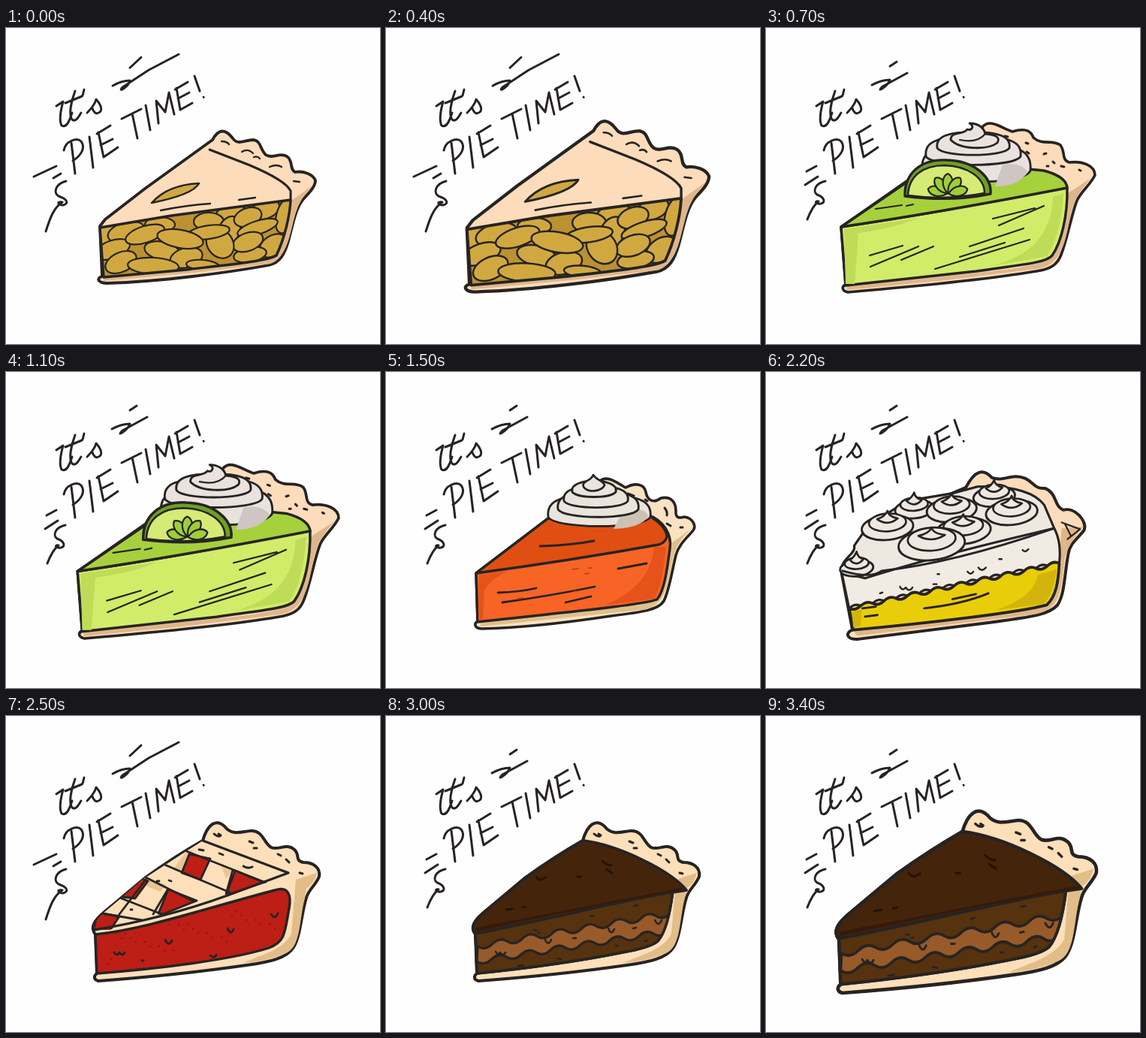
Animation, 498 px wide and 421 px high, one loop 3.5 s. Source, as an HTML page:

```html
<!DOCTYPE html>
<html lang="en">
<head>
<meta charset="utf-8">
<title>Pie time</title>
<style>
html, body { margin: 0; width: 100%; height: 100%; overflow: hidden; background: #fdfefd; }
svg { display: block; width: 498px; height: 421px; }
path, ellipse { stroke-linecap: round; stroke-linejoin: round; }
</style>
</head>
<body>
<svg id="stage" viewBox="0 0 498 421" role="img" aria-label="it's PIE TIME!"></svg>
<script>
const INK = '#262423', CRUST = '#fcdcba', SHADE = '#dfb68a';
const fill = (d, color) => `<path d="${d}" fill="${color}"/>`;
const line = (d, w = 3, color = INK) => `<path d="${d}" fill="none" stroke="${color}" stroke-width="${w}"/>`;
const shape = (d, color, w = 3.4) => `<path d="${d}" fill="${color}" stroke="${INK}" stroke-width="${w}"/>`;
const oval = (x, y, rx, ry, rot, color, w = 2.2) =>
  `<ellipse cx="${x}" cy="${y}" rx="${rx}" ry="${ry}" transform="rotate(${rot} ${x} ${y})" fill="${color}" stroke="${INK}" stroke-width="${w}"/>`;
const clip = (id, d, body) => `<clipPath id="${id}"><path d="${d}"/></clipPath><g clip-path="url(#${id})">${body}</g>`;

// Wavy segments between two points, continuing the current path
function wave(x0, y0, x1, y1, n, a) {
  let d = '';
  for (let i = 0; i < n; i++) {
    const dx = (x1 - x0) / n, dy = (y1 - y0) / n;
    d += `q${dx / 2} ${dy / 2 + (i % 2 ? -a : a)} ${dx} ${dy}`;
  }
  return d;
}

// One whipped layer: flat dome with a rounded underside
const layer = (l, r, y, h, color) =>
  shape(`M${l} ${y}C${l - 3} ${y - h} ${l + 18} ${y - h * 1.25} ${(l + r) / 2} ${y - h * 1.25}S${r + 3} ${y - h} ${r} ${y}C${r - 8} ${y + h * .72} ${l + 8} ${y + h * .72} ${l} ${y}Z`, color, 2.8);

function apple() {
  const front = 'M125 266L220 250L379 229C378 250 371 280 360 303C350 310 300 315 240 322L130 332Z';
  const slices = [
    [345, 242, 20, 12, -20], [372, 250, 12, 24, 15], [300, 250, 22, 14, -10], [355, 290, 20, 13, -35],
    [325, 302, 22, 10, -10], [270, 258, 20, 12, 0], [135, 275, 14, 16, 20], [160, 272, 25, 13, -15],
    [205, 262, 20, 10, 0], [142, 295, 24, 12, -20], [153, 312, 22, 13, -25], [185, 275, 27, 11, -18],
    [208, 297, 24, 12, 12], [240, 306, 22, 13, -15], [297, 270, 14, 20, 25], [322, 252, 19, 12, -20],
    [335, 266, 28, 9, -18], [322, 285, 21, 12, -20], [285, 287, 17, 21, -35], [270, 272, 28, 9, -8],
    [232, 281, 31, 12, 10], [196, 317, 34, 11, 3], [262, 316, 22, 7, 5]
  ];
  return shape('M125 264L132 255L185 214L275 149C283 134 292 134 302 147C309 157 318 149 329 149C340 150 338 162 346 169C355 175 364 165 374 171C383 177 377 188 385 192C396 190 409 195 412 203C412 212 402 221 395 229C385 242 382 262 376 284C371 301 365 313 350 316C295 326 205 338 135 340C122 340 120 333 128 331Z', CRUST, 3.8)
    + fill('M380 230L409 209Q391 228 386 246C378 271 376 305 352 314L250 326L130 337L130 333L330 312Q360 307 366 292Z', SHADE)
    + clip('applefront', front, fill(front, '#bb9131') + slices.map(s => oval(...s, '#d1a840')).join(''))
    + line(front, 3.4) + line('M271 162L325 183Q372 203 379 217V228')
    + shape('M194 233Q215 209 257 207Q249 222 194 233Z', '#d1a840', 2.6)
    + line('M287 151q7 0 10 4M314 165q8-5 15 2M330 172q5-2 8 2M351 185q9-4 16 0M383 204l8 1M206 243q35-7 66-9M310 229l22-3', 2.3);
}

function lime() {
  const front = 'M100 265Q230 246 401 212C402 250 393 286 381 303C374 313 335 316 280 324L106 343Z';
  const top = 'M100 265L185 207Q225 180 309 184L370 190Q400 198 401 213Q230 246 100 265Z';
  let petals = '';
  for (let a = -76; a <= 76; a += 38)
    petals += `<g transform="rotate(${a} 242 221)">${shape('M242 220C232 210 235 197 242 194C249 197 252 210 242 220Z', '#9fce38', 2.2)}</g>`;
  const cream = '#e9e2df';
  return shape('M288 132C298 120 313 133 328 138C341 134 352 134 356 146C368 157 381 148 392 156C399 165 393 176 404 179C421 177 438 183 438 196C432 209 420 217 414 230C406 251 402 279 393 302C388 315 380 321 360 324C290 336 190 345 109 352C100 350 101 344 106 342L100 265L186 205Z', CRUST, 3.6)
    + fill('M402 220L433 200Q412 222 406 247C399 282 395 317 360 321L240 336L108 349V344L280 326Q369 318 382 304Q399 271 402 220Z', SHADE)
    + shape(front, '#d1ec69') + fill('M104 268L203 253Q170 267 123 273L118 341L106 341ZM396 220Q392 279 374 304L300 317Q380 298 382 225Z', '#bedc58')
    + shape(top, '#a6d13d')
    + layer(208, 352, 190, 28, cream) + fill('M315 182Q339 178 349 192Q334 212 305 211Z', '#cfc5c3')
    + layer(213, 339, 171, 21, cream) + layer(228, 324, 160, 17, cream)
    + shape('M246 149C246 137 263 143 268 135C274 137 278 131 271 127C286 127 291 136 292 141C304 142 313 145 308 153C295 163 258 162 246 149Z', cream, 2.8)
    + line('M258 149Q281 154 292 141', 2.2)
    + shape('M185 224C184 194 206 174 241 176C276 177 301 197 299 221Q245 232 185 224Z', '#6d9f27', 3.4)
    + shape('M189 223C190 197 209 183 238 183C268 184 291 199 291 220Q238 230 189 223Z', '#d5eb75', 2.5)
    + clip('limecut', 'M189 223C190 197 209 183 238 183C268 184 291 199 291 220Q238 230 189 223Z', petals)
    + line('M146 241L181 236M187 237L196 235M302 254L358 240M310 263L370 237M138 303L182 290M139 318L203 291M180 309L223 291M271 291L343 267M225 321L351 282M258 305L318 286', 2.2)
    + line('M318 144l4 1M346 153l3 1M347 165l3 2M370 168l3-1M374 184l2 0M397 185l-4-1M417 189l2 1M382 178l2 2', 3);
}

function pumpkin() {
  const cream = '#e9e4dc';
  return shape('M283 147C294 135 308 148 319 154C332 147 344 149 346 160C348 172 357 175 366 168C380 165 386 174 386 185C385 195 391 195 397 193C407 194 414 204 409 211C402 220 390 229 386 244C380 269 377 291 370 305C363 317 341 320 300 325C240 334 180 341 127 342C116 341 118 334 122 332L120 268L216 195Z', '#f8e2c1', 3.6)
    + fill('M379 229L406 209Q388 226 383 244C375 281 374 313 340 317L126 339L126 334L340 310Q364 304 368 292Z', '#dfbf8b')
    + shape('M120 268L216 195L300 185L348 190C369 197 381 216 378 235C374 267 370 292 361 303C340 311 220 322 122 333Z', '#f76425')
    + shape('M120 268L216 195L348 190Q374 205 374 220Q371 228 363 230Q240 252 120 268Z', '#e04f11')
    + fill('M124 270L162 265Q139 276 131 291L129 329L123 330ZM373 233Q368 284 357 302L290 311Q352 287 357 233Z', '#e5531a')
    + layer(216, 352, 193, 23, cream) + fill('M315 186Q345 177 349 193Q338 208 303 209Z', '#cbc2b4')
    + layer(229, 336, 183, 19, cream) + layer(237, 322, 172, 16, cream) + layer(248, 306, 160, 12, cream)
    + shape('M263 153C260 145 273 146 276 137C280 144 290 145 291 151C286 160 268 161 263 153Z', cream, 2.6)
    + line('M205 232Q245 231 277 225M309 262L347 255M149 294Q178 293 200 288M155 307Q220 298 278 286M239 307L273 299', 2.8)
    + line('M248 263l8-1M265 269l5-1M270 261l4 0M175 302l8-1M250 292l5 0', 1.7, '#b73e10')
    + line('M322 162l8 3M345 170l3 2M371 181q4 5 3 10M374 202l5 3M392 207l3 0', 3);
}

// Piped rosette with a pointed tip
function rosette(x, y, r) {
  const c = '#eee8e1', h = r * .48;
  return oval(x, y + 5, r, h, -6, c, 2.6) + oval(x, y - 1, r * .72, h * .72, -4, c, 2.4)
    + shape(`M${x - r * .4} ${y - 5}Q${x - 3} ${y - 8} ${x} ${y - 15}Q${x + 1} ${y - 8} ${x + r * .4} ${y - 6}Q${x} ${y + 4} ${x - r * .4} ${y - 5}Z`, c, 2.4);
}

function lemon() {
  const lower = 'M126 308' + wave(126, 308, 378, 254, 18, 5) + 'C377 277 374 294 363 304C330 313 220 326 131 334Z';
  const side = 'M117 265L145 272Q230 245 372 212Q381 229 378 254' + wave(378, 254, 126, 308, 18, 5) + 'Z';
  const spots = [[300, 169, 25], [204, 184, 23], [249, 185, 30], [321, 188, 31], [172, 206, 31], [263, 210, 33], [225, 226, 40], [135, 255, 20]];
  return shape('M266 163C277 142 287 140 297 151C311 157 321 145 337 152C348 157 348 165 361 164C376 170 371 185 383 190C396 186 412 203 408 214C402 223 391 229 389 242C384 268 385 290 376 304C365 317 337 319 295 325L137 345C121 346 122 336 130 334L117 266L145 214Z', CRUST, 3.6)
    + fill('M381 212L407 210Q391 227 385 246C380 285 382 314 340 316L136 341L131 335L330 312Q369 303 374 286Z', SHADE)
    + shape('M117 265C114 249 135 243 132 233Q142 218 151 207L196 179L250 170L280 162Q342 160 360 184L372 212L210 258Q170 275 145 272Z', '#eee8e1', 2.8)
    + shape(side, '#f1ebe4', 2.8) + shape(lower, '#eacd09')
    + fill('M375 261Q371 292 359 303L302 310Q349 294 352 268ZM129 312L141 310L140 329L131 331Z', '#d2b40b')
    + spots.map(s => rosette(...s)).join('')
    + line('M118 263Q152 273 165 263Q250 254 369 213M142 308L158 306M145 318L160 316M216 308Q262 303 293 290M250 297L278 291', 2.6)
    + line('M187 282q3 6 7 1q4 6 8 0M268 264q4 5 7 0M281 259q4 6 9 0M334 238q3 4 7-1M227 279l4 0M163 290l3-1M306 249l3 0M232 267l2 0', 2.2)
    + line('M381 205l22 8l-15 12M385 207l7 14', 2);
}

const TALL = 'M262 166C268 145 279 136 291 147C301 160 314 154 326 153C342 152 343 169 353 175C363 180 373 168 384 178C392 185 384 193 396 195C409 195 419 202 417 214C412 226 403 231 400 242C393 263 393 291 383 308C374 323 350 328 320 332Q230 345 123 353C116 351 117 346 121 343L119 291C111 281 119 271 131 261L186 215Q225 187 262 166Z';
const tallCrust = () => shape(TALL, '#fddfba', 4)
  + fill('M386 218L414 209Q411 222 400 230L398 242C390 273 393 307 373 316Q345 328 315 329L335 321Q372 308 380 290Z', '#e2bd88')
  + line('M277 157q4 4 8 3M283 157l3 2M324 167l5 2M330 176l4 0M362 184l4 2M373 191l4 4M391 209l4 1', 3);

function cherry() {
  const top = 'M117 285Q116 276 130 262L186 215L240 180L262 166L376 209Q373 214 360 218Q210 266 137 285Z';
  const red = '#bd1e15';
  const patches = ['M116 287L122 262L151 267L137 288Z', 'M146 240L174 214L189 220L172 243Z', 'M203 263L216 231L254 246L209 264Z',
    'M234 209L244 184L272 190L259 218Z', 'M294 236L305 206L344 222L298 237Z'];
  const front = 'M119 291C185 284 260 258 358 232C377 226 380 240 377 256C371 289 372 301 350 309C300 325 200 337 121 343Z';
  let dots = '';
  for (let i = 0; i < 30; i++) {
    const x = 135 + i * 83 % 230, y = 331 - (x - 130) * .18 - i * 37 % 40;
    dots += `M${x} ${y}h.1`;
  }
  return tallCrust() + clip('lattice', top, fill(top, '#fddfba')
      + fill('M185 216L214 225L205 234L170 219ZM238 183L249 178L236 210L222 205ZM286 198L302 205L293 217Z', '#e8c594')
      + patches.map(p => shape(p, red, 2.8)).join('')
      + line('M122 262L181 272M146 240L205 263M186 215L250 247M211 198L298 235M240 180L346 222M186 218L148 268M216 230L196 264M302 205L293 237', 2.8))
    + line('M117 285Q210 270 295 239L376 209L262 166', 3.3)
    + shape(front, red, 3.4) + line(dots, 2, '#7d1712')
    + line('M212 298q4 10 9 1M295 283q4 10 8 1M353 264q5 8 9-1M144 315q4 6 7 0q4 6 7 0M272 319q5 5 8-1M181 326l2 0', 2.8)
    + line('M166 258l2 0M201 220l3 0M217 219l3 1M257 178l6 1M284 183l5 2M316 200q6 4 12 1', 2.8);
}

function chocolate() {
  const front = 'M119 289Q240 264 382 233C379 258 374 286 362 300Q351 309 315 315Q230 332 121 343Z';
  const band = 'M122 307' + wave(122, 307, 379, 263, 13, 8) + 'L376 287' + wave(376, 287, 121, 327, 13, 8) + 'Z';
  return tallCrust() + shape(front, '#56320f')
    + clip('chocfront', front, shape(band, '#985a29', 3.2)) + line(front, 3.4)
    + shape('M119 290C111 281 119 271 131 261L186 215Q226 187 262 166C309 172 378 205 400 232Q348 239 285 254Q190 276 119 290Z', '#45240c', 3.8)
    + fill('M119 282L393 229L399 231L285 252L121 287Z', '#351b0a')
    + line('M208 217l5-2M200 214q4 6 9 3M288 193q5 6 12 6M293 204l8 5M160 258l8-1M182 255l4-1M255 214l4 0', 2.8, '#241307')
    + line('M212 298q4 9 8 0M296 283q4 10 8 1M358 272q5 10 9 0M146 314q3 6 6 1q4 6 7 0M249 296l4 0M329 283l4-1', 2.6)
    + line('M197 285l3 1M203 289l2 0M272 267l4-1M330 253l5-1M176 333l7-1M228 323l5 1M306 306l3 0M345 300l3-1', 2.4);
}

const lettering = line('M67 104L76 98C73 109 70 122 74 130C81 134 85 122 88 113M92 84C87 97 83 115 88 122C93 126 97 118 100 113M79 100L101 91M104 82L102 90M108 113Q118 103 120 95Q129 105 126 111Q119 118 115 107'
  + 'M87 153L92 194M77 163C79 151 94 145 100 151C106 159 101 169 89 177M111 145L116 186M123 139L130 172M121 141L139 130M126 156L142 148M130 172L149 159'
  + 'M154 121L180 108M168 114L175 147M186 103L192 136M203 127L200 97L212 112L217 86L224 115M227 80L232 109M225 82L242 72M229 94L244 86M232 109L248 100M251 64L258 84M263 92l.2 .2', 3);
const longMarks = line('M165 53L180 39M142 77Q154 70 165 70C163 79 148 87 155 79L190 56L230 35M37 198L67 184M63 200L73 194M80 204C65 208 63 220 70 224C82 228 84 234 76 236C69 236 67 231 75 232C64 239 59 252 53 271', 3);
const shortMarks = line('M165 51L174 45M141 76Q154 69 165 69C162 78 145 88 155 78L188 60M54 191L67 184M52 209L69 198M79 204C65 207 62 218 68 222C79 226 79 233 73 234C66 235 64 230 70 231Q62 237 55 255', 3);

// First frame of each slice and its final scale
const pies = [
  [apple, 0, 1.185], [lime, 7, 1.05], [pumpkin, 15, 1.22],
  [lemon, 20, 1.22], [cherry, 25, 1.21], [chocolate, 30, 1.15]
];
const FRAMES = 35, CX = 265, CY = 246;
const stage = document.getElementById('stage');
stage.innerHTML = lettering + `<g>${longMarks}</g><g>${shortMarks}</g>` + pies.map(p => `<g class="pie">${p[0]()}</g>`).join('');
const [longGroup, shortGroup] = stage.querySelectorAll(':scope > g');
const pieGroups = stage.querySelectorAll('.pie');
const show = (el, on) => el.setAttribute('visibility', on ? 'visible' : 'hidden');
const start = performance.now();

function draw(now) {
  const n = Math.floor(Math.max(0, now - start) / 100) % FRAMES;
  show(longGroup, n % 4 < 2);
  show(shortGroup, n % 4 > 1);
  pies.forEach(([, first, peak], i) => {
    const next = i + 1 < pies.length ? pies[i + 1][1] : FRAMES;
    const on = n >= first && n < next;
    show(pieGroups[i], on);
    if (!on) return;
    const s = 1 + (peak - 1) * (n - first) / (next - first - 1);
    pieGroups[i].setAttribute('transform', `translate(${CX} ${CY}) scale(${s}) translate(${-CX} ${-CY})`);
  });
  requestAnimationFrame(draw);
}
draw(start);
</script>
</body>
</html>
```
